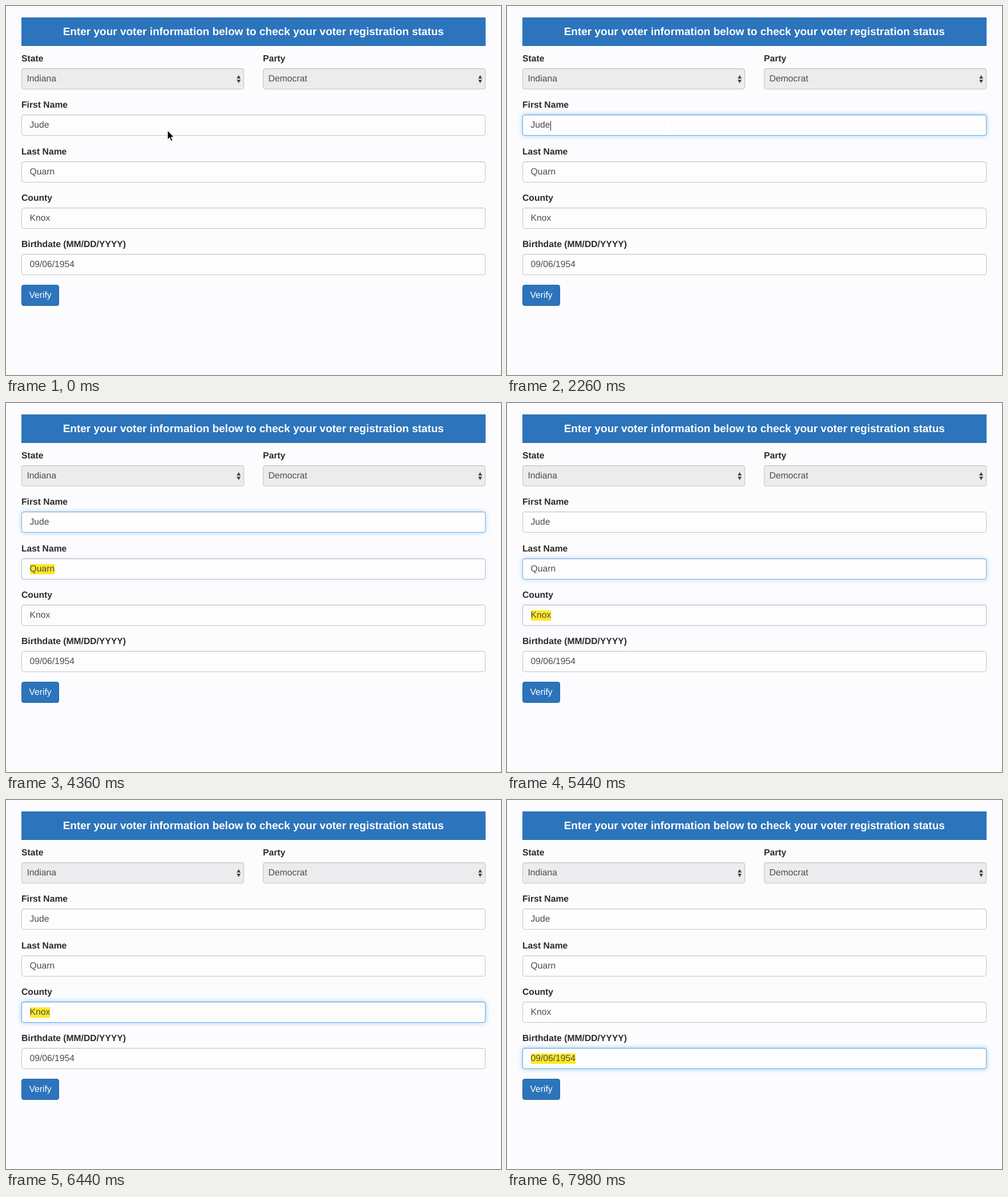
An HTML page that plays this animation: 867 px wide and 646 px high, repeating every 8000 ms.

```html
<!DOCTYPE html>
<html lang="en">
<head>
<meta charset="utf-8">
<title>Voter registration form</title>
<style>
  html, body { margin: 0; width: 100%; height: 100%; overflow: hidden; background: #fcfcfe; }
  body { position: relative; font: 15.7px "Liberation Sans", Arial, sans-serif; color: #4c4c4c; text-rendering: geometricPrecision; }
  div, svg { position: absolute; box-sizing: border-box; white-space: nowrap; }
  .banner { left: 27px; top: 20px; width: 812.5px; height: 50px; line-height: 51px; background: #2c74bb; color: #fff; font-size: 19px; font-weight: bold; text-align: center; }
  .label { line-height: 18px; color: #2a2a2a; font-weight: bold; }
  .box { height: 37px; line-height: 35px; border: 1px solid #c6c6c6; border-radius: 4px; background: #fdfdfe; box-shadow: inset 0 1px 1px rgba(0, 0, 0, .06); }
  .input { left: 27px; width: 812.5px; padding-left: 13.5px; }
  .select { width: 390px; padding-left: 8.5px; background: #ececee; }
  .select svg { right: 5px; top: 11px; }
  .ring { inset: -1px; border: 1px solid #62aeea; border-radius: 4px; box-shadow: inset 0 1px 1px rgba(0, 0, 0, .06), 0 0 8px rgba(102, 175, 233, .6); opacity: 0; }
  .mark { position: relative; display: inline-block; line-height: 18px; }
  .mark i { position: absolute; inset: 0; background: #ffe924; opacity: 0; }
  .mark b { position: relative; font-weight: normal; }
  .button { left: 27px; top: 488px; width: 66px; height: 37px; line-height: 35px; border: 1px solid #2766a5; border-radius: 4px; background: #2c74bb; color: #fff; text-align: center; }
  #caret { left: 76px; top: 201px; width: 1px; height: 17px; background: #222; opacity: 0; }
  #arrow, #beam { left: 0; top: 0; overflow: visible; }
</style>
</head>
<body>
<div class="banner">Enter your voter information below to check your voter registration status</div>
<div class="button">Verify</div>
<div id="caret"></div>
<svg id="arrow" width="12" height="20"><path d="M0 0V16L3.6 12.6L6.2 18.6L8.8 17.5L6.2 11.7H11.2Z" fill="#000" stroke="#fff" stroke-width="1"/></svg>
<svg id="beam" width="1" height="1"><g fill="none"><path id="stem" d="M-4 -8.5Q-.3 -8.5 0 -6.5Q.3 -8.5 4 -8.5M0 -6.5V6.5M-4 8.5Q-.3 8.5 0 6.5Q.3 8.5 4 8.5M-2 3.5H2" stroke="#fff" stroke-width="3"/><use href="#stem" style="stroke:#111"/></g></svg>
<script>
const LOOP = 8000, FADE = 150;
const CLICK = 1900, TABS = [4330, 5410, 6490];
const $ = id => document.getElementById(id);

function add(parent, className, text = '', style = {}) {
  const el = document.createElement('div');
  el.className = className;
  el.textContent = text;
  Object.assign(el.style, style);
  return parent.appendChild(el);
}

// points: [ms, value]; the last value holds until the loop restarts
function track(el, prop, points, easing = 'linear') {
  const frames = [...points, [LOOP, points.at(-1)[1]]]
    .map(([ms, value]) => ({ offset: ms / LOOP, [prop]: value, easing }));
  const anim = el.animate(frames, { duration: LOOP, iterations: Infinity });
  anim.startTime = 0;
  return anim;
}

const label = (text, left, top) => add(document.body, 'label', text, { left: left + 'px', top: top - 25.5 + 'px' });

function select(title, value, left) {
  label(title, left, 109);
  const box = add(document.body, 'box select', value, { left: left + 'px', top: '109px' });
  box.insertAdjacentHTML('beforeend', '<svg width="7" height="14"><path d="M0 6L3.5 0L7 6ZM0 8L3.5 14L7 8Z" fill="#444"/></svg>');
}

function input(title, value, top, from, to, highlighted) {
  label(title, 27, top);
  const box = add(document.body, 'box input', '', { top: top + 'px' });
  const ring = add(box, 'ring');
  box.insertAdjacentHTML('beforeend', `<span class="mark"><i></i><b>${value}</b></span>`);
  const fade = [[0, 0], [from, 0], [from + FADE, 1]];
  const marks = [[0, 0], [from, 1]];
  if (to) {
    fade.push([to, 1], [to + FADE, 0]);
    marks.push([to, 0]);
  }
  const anims = [track(ring, 'opacity', fade)];
  if (highlighted) anims.push(track(box.querySelector('i'), 'opacity', marks, 'step-end'));
  return anims;
}

select('State', 'Indiana', 27);
select('Party', 'Democrat', 450);

const anims = [
  ...input('First Name', 'Jude', 190, CLICK, TABS[0], false),
  ...input('Last Name', 'Quarn', 272, TABS[0], TABS[1], true),
  ...input('County', 'Knox', 353, TABS[1], TABS[2], true),
  ...input('Birthdate (MM/DD/YYYY)', '09/06/1954', 434, TABS[2], 0, true)
];

const blink = [[0, 0]];
for (let ms = CLICK, on = 1; ms < TABS[0]; ms += 500, on = 1 - on) blink.push([ms, on]);
blink.push([TABS[0], 0]);
anims.push(track($('caret'), 'opacity', blink, 'step-end'));

const path = [[0, 'translate(283px, 218px)'], [200, 'translate(283.5px, 210px)']];
for (const id of ['arrow', 'beam']) {
  document.body.append($(id));
  anims.push(track($(id), 'transform', path));
}
document.body.append($('caret'));
anims.push(track($('arrow'), 'opacity', [[0, 1], [100, 0]], 'step-end'));
anims.push(track($('beam'), 'opacity', [[0, 0], [100, 1], [TABS[0], 0]], 'step-end'));

// All tracks share one clock that begins at page load
const start = document.timeline.currentTime ?? 0;
for (const anim of anims) anim.startTime = start;
</script>
</body>
</html>
```
